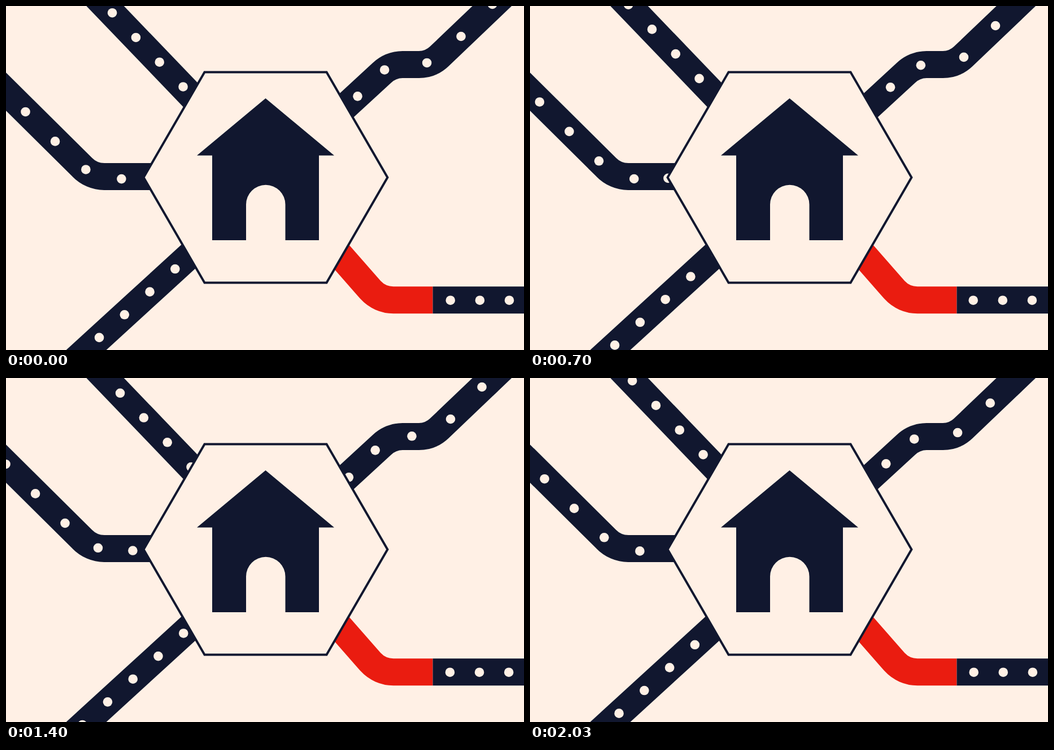
An HTML page for the animation above (2100 ms loop, 917 by 611 pixels).

```html
<!DOCTYPE html>
<html lang="en">
<head>
<meta charset="utf-8">
<title>Roads to a house</title>
<style>
  html, body { margin: 0; width: 100%; height: 100%; overflow: hidden; background: #fff0e5; }
  svg { display: block; width: 100%; height: 100%; }
  .road { fill: none; stroke: #11172f; stroke-width: 48; }
  .red { stroke: #ea1c10; }
  .dark { fill: #11172f; }
  .light, #dots { fill: #fff0e5; }
</style>
</head>
<body>
<svg viewBox="0 0 917 611">
  <path class="road" d="M146.8-30L350 182.4"/>
  <path class="road" d="M-40 112.2L134.7 286.1A55 55 0 0 0 174 303H270"/>
  <path class="road" d="M110 640.4L340 429.4"/>
  <path class="road" d="M891.8-30L767.1 89.4A52 52 0 0 1 731 104H702A55 55 0 0 0 665.2 118.9L590 188.5"/>
  <path class="road red" d="M580 429.4L645.1 504.1A55 55 0 0 0 686 522.2H755.5"/>
  <path class="road" d="M755.5 522.2H930"/>
  <g id="dots"></g>
  <path class="light" stroke="#11172f" stroke-width="4"
    d="M243.6 304.5L351.5 117.5H567.5L675.4 304.5L567.5 491.5H351.5Z"/>
  <path class="dark"
    d="M459.5 164L581 265.5H554V416H494.5V352.5A34.75 34.75 0 0 0 425 352.5V416H365V265.5H338Z"/>
</svg>
<script>
const FRAME = 70, CYCLE = 6, DOTS = 5, EASE = 2;

// Start point and velocity per step; each turn eases to a new velocity.
const tracks = [
  { from: [146.3, -31.5], v: [6.97, 7.29], turns: [] },
  { from: [120.3, 629.5], v: [7.46, -6.77], turns: [] },
  { from: [-18, 135.5], v: [8.75, 8.74],
    turns: [{ at: 17.6, v: [11.3, 5.5] }, { at: 21, v: [10, -0.3] }] },
  { from: [861, -3], v: [-9.25, 9.5],
    turns: [{ at: 11, v: [-13.6, 0.6] }, { at: 17.1, v: [-7.8, 8] }] }
];

const layer = document.getElementById('dots');

function makeDot() {
  const dot = document.createElementNS('http://www.w3.org/2000/svg', 'circle');
  dot.setAttribute('r', 8.3);
  return layer.appendChild(dot);
}

function place(dot, x, y) {
  dot.setAttribute('cx', x);
  dot.setAttribute('cy', y);
}

// Zero before the turn, t after it, with a rounded join between.
function ramp(t) {
  return Math.abs(t) < EASE ? (t + EASE) ** 2 / (4 * EASE) : Math.max(t, 0);
}

function position({ from, v, turns }, step) {
  return from.map((origin, axis) => {
    let p = origin + v[axis] * step, speed = v[axis];
    for (const turn of turns) {
      p += (turn.v[axis] - speed) * ramp(step - turn.at);
      speed = turn.v[axis];
    }
    return p;
  });
}

const movers = tracks.map(() => Array.from({ length: DOTS }, makeDot));
const queue = Array.from({ length: 3 }, makeDot);
const start = performance.now();

function draw() {
  const step = Math.floor((performance.now() - start) / FRAME) % CYCLE;
  movers.forEach((dots, t) => dots.forEach((dot, k) =>
    place(dot, ...position(tracks[t], step + k * CYCLE))));

  // The blocked dots only rock in place.
  const rock = 1.2 * Math.cos(2 * Math.PI * (step - 0.6) / CYCLE);
  queue.forEach((dot, k) => place(dot, 785.8 + rock + k * 52.1, 522.7));
  requestAnimationFrame(draw);
}
draw();
</script>
</body>
</html>
```
